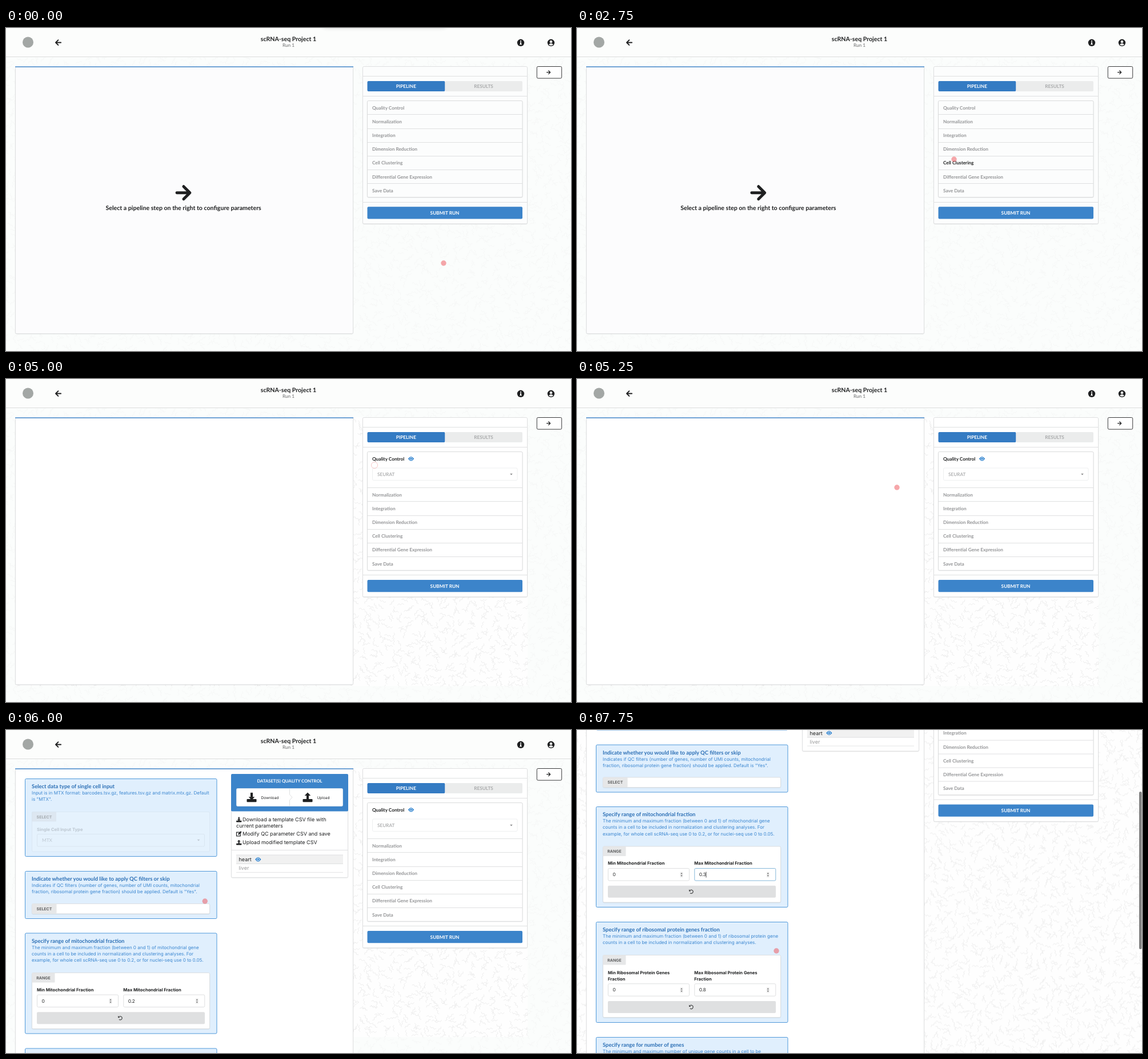
Write an HTML page with a canvas that moves like this. It is 989 px wide and 566 px high and loops after 8 s.

```html
<!DOCTYPE html>
<html lang="en">
<head>
<meta charset="utf-8">
<title>Pipeline setup</title>
<style>
html, body { margin: 0; width: 989px; height: 566px; overflow: hidden; background: #fff; }
canvas { display: block; }
</style>
</head>
<body>
<canvas id="stage" width="989" height="566"></canvas>
<script>
const W = 989, H = 566, LOOP = 8000, STEP = 250;
const ctx = document.getElementById('stage').getContext('2d');
ctx.textRendering = 'geometricPrecision';
const BLUE = '#3c84ca', INK = '#1f2021', DIM = '#949597', LINE = '#dfe0e1';
const LATO = 'Lato, sans-serif', INTER = 'Inter, sans-serif';
const STEPS = ['Quality Control', 'Normalization', 'Integration', 'Dimension Reduction',
  'Cell Clustering', 'Differential Gene Expression', 'Save Data'];
const ROW = 24.15, BODY = 8.26;

const POINTER = [[0, 766, 412], [250, 770, 411], [750, 790, 408], [1250, 804, 411], [1750, 803, 421],
  [2250, 745, 375], [2500, 690, 302], [2750, 660, 230], [3000, 647, 142], [3500, 645, 237], [3750, 645, 261],
  [4000, 645, 283], [4500, 645, 142], [5000, 645, 151], [5250, 560, 190], [5750, 349.5, 280],
  [6250, 347, 320], [6750, 335, 362], [7000, 335, 364], [7250, 342, 392], [7750, 349, 387]];
const SCROLL = [[6250, 0], [6750, 108.5], [7250, 108.5], [7750, 221.5]];
const RING_TIMES = [1750, 5000, 7250];

function track(keys, t) {
  if (t <= keys[0][0]) return keys[0].slice(1);
  for (let i = 1; i < keys.length; i++) {
    const a = keys[i - 1], b = keys[i];
    if (t <= b[0]) {
      const k = (t - a[0]) / (b[0] - a[0]);
      return a.slice(1).map((v, j) => v + (b[j + 1] - v) * k);
    }
  }
  return keys[keys.length - 1].slice(1);
}

function text(str, x, y, size, color = INK, { bold = false, face = LATO, align = 'left' } = {}) {
  ctx.font = `${bold ? 'bold ' : ''}${size}px ${face}`;
  ctx.fillStyle = color;
  ctx.textAlign = align;
  ctx.fillText(str, x, y + size * 0.35);
}

function box(x, y, w, h, fill, stroke, r = 2) {
  ctx.beginPath();
  ctx.roundRect(x, y, w, h, r);
  if (fill) { ctx.fillStyle = fill; ctx.fill(); }
  if (stroke) { ctx.strokeStyle = stroke; ctx.lineWidth = 1; ctx.stroke(); }
}

// A bordered box whose fill alone casts a soft shadow.
function card(x, y, w, h, fill, stroke, blur = 1.5) {
  ctx.save();
  ctx.shadowColor = 'rgba(34,36,38,.16)';
  ctx.shadowBlur = blur;
  ctx.shadowOffsetY = 0.8;
  box(x, y, w, h, fill);
  ctx.restore();
  if (stroke) box(x, y, w, h, null, stroke);
}

function rule(x1, x2, y, color = LINE) {
  ctx.fillStyle = color;
  ctx.fillRect(x1, y, x2 - x1, 1);
}

function disc(x, y, r, color) {
  ctx.beginPath();
  ctx.arc(x, y, r, 0, 7);
  ctx.fillStyle = color;
  ctx.fill();
}

function poly(points, color) {
  ctx.beginPath();
  points.forEach(([x, y]) => ctx.lineTo(x, y));
  ctx.fillStyle = color;
  ctx.fill();
}

// Runs a drawing in unit coordinates around (x, y).
function at(x, y, size, draw, flip = 1) {
  ctx.save();
  ctx.translate(x, y);
  ctx.scale(size * flip, size);
  draw();
  ctx.restore();
}

function arrow(x, y, size, dir = 1) {
  at(x, y, size, () => {
    ctx.strokeStyle = INK;
    ctx.lineWidth = 0.17;
    ctx.lineCap = ctx.lineJoin = 'round';
    ctx.beginPath();
    ctx.moveTo(-0.4, 0); ctx.lineTo(0.36, 0);
    ctx.moveTo(0.01, -0.38); ctx.lineTo(0.39, 0); ctx.lineTo(0.01, 0.38);
    ctx.stroke();
  }, dir);
}

function eye(x, y) {
  ctx.beginPath();
  ctx.moveTo(x - 5.2, y);
  ctx.quadraticCurveTo(x, y - 7.4, x + 5.2, y);
  ctx.quadraticCurveTo(x, y + 7.4, x - 5.2, y);
  ctx.fillStyle = '#2f83cf';
  ctx.fill();
  disc(x, y, 2.5, '#fff');
  disc(x, y, 1.7, '#2f83cf');
}

function transfer(x, y, size, up) {
  at(x, y, size, () => {
    ctx.fillStyle = INK;
    ctx.beginPath();
    ctx.roundRect(-0.5, 0.18, 1, 0.3, 0.06);
    ctx.fill();
    const tip = up ? -0.5 : 0.3, base = up ? -0.17 : -0.05;
    ctx.fillRect(-0.12, up ? -0.2 : -0.48, 0.24, 0.46);
    poly([[-0.31, base], [0.31, base], [0, tip]], INK);
  });
}

function pencil(x, y) {
  ctx.strokeStyle = INK;
  ctx.lineWidth = 1.2;
  ctx.strokeRect(x - 4.2, y - 2.8, 6.8, 6.6);
  ctx.lineWidth = 2.4;
  ctx.beginPath();
  ctx.moveTo(x - 1, y + 1); ctx.lineTo(x + 4, y - 4);
  ctx.stroke();
}

function undo(x, y) {
  ctx.strokeStyle = '#4a4b4c';
  ctx.lineWidth = 1.2;
  ctx.beginPath();
  ctx.arc(x, y, 3.1, -2.6, 2.3);
  ctx.stroke();
  poly([[x - 4, y - 4], [x - 4, y - 0.5], [x - 0.6, y - 0.5]], '#4a4b4c');
}

function caret(x, y, color) {
  poly([[x - 2.3, y - 1.2], [x + 2.3, y - 1.2], [x, y + 1.4]], color);
}

const pattern = (() => {
  const c = document.createElement('canvas');
  c.width = W; c.height = 820;
  const g = c.getContext('2d');
  let seed = 7;
  const rnd = () => (seed = seed * 16807 % 2147483647) / 2147483647;
  g.strokeStyle = '#ebebeb';
  g.lineWidth = 0.9;
  for (let y = 0; y < 830; y += 11) for (let x = 0; x < W; x += 12) {
    const a = rnd() * Math.PI * 2;
    let px = x + rnd() * 9, py = y + rnd() * 9;
    g.beginPath();
    g.moveTo(px, py);
    for (let i = 0; i < 4; i++) {
      const b = a + (i % 2 ? 0.65 : -0.65);
      g.lineTo(px += Math.cos(b) * 3.6, py += Math.sin(b) * 3.6);
    }
    g.stroke();
  }
  return c;
})();

function background(t, scroll) {
  const crisp = t >= 6250;
  ctx.fillStyle = crisp ? '#fefefe' : '#fbfdfc';
  ctx.fillRect(0, 0, W, H);
  ctx.globalAlpha = crisp ? 1 : 0.35;
  ctx.drawImage(pattern, 0, -scroll);
  ctx.globalAlpha = 1;
  if (t >= 4750 && !crisp) {
    ctx.fillStyle = '#fefefe';
    ctx.fillRect(17, 67, 896, 471);
    ctx.drawImage(pattern, 17, 67, 896, 471, 17, 67, 896, 471);
  }
}

function header(t) {
  ctx.fillStyle = '#fcfdfc';
  ctx.fillRect(0, 0, W, 50);
  rule(0, W, 50, '#dcdddd');
  if (t < 250) card(556, -12, 213, 11, '#ddd', null, 7);
  disc(38.5, 25, 9.5, '#a3a7a5');
  arrow(91.5, 25.5, 11.5, -1);
  text('scRNA-seq Project 1', 494.5, 19, 10.6, INK, { bold: true, align: 'center' });
  text('Run 1', 494.5, 30.5, BODY, '#6a6b6c', { align: 'center' });
  disc(901, 25.8, 6.2, INK);
  ctx.fillStyle = '#fff';
  ctx.fillRect(900, 22, 2, 1.8);
  ctx.fillRect(900, 24.8, 2, 4);
  ctx.fillRect(899.3, 28, 3.4, 1.2);
  disc(954, 25.8, 6.2, INK);
  ctx.save();
  ctx.beginPath();
  ctx.arc(954, 25.8, 5, 0, 7);
  ctx.clip();
  disc(954, 24, 2.3, '#fff');
  disc(954, 31.2, 4.2, '#fff');
  ctx.restore();
}

function leftPanel(t) {
  const bottom = t >= 5500 ? 1060 : 535.5;
  card(16.5, 68.5, 591, bottom - 68.5, t >= 4750 ? '#fff' : '#fcfcfd', LINE);
  ctx.fillStyle = BLUE;
  ctx.fillRect(16, 67.3, 592, 1.4);
  if (t < 4750) {
    const sway = -7 * Math.cos(Math.PI * (t / 1000 - 1.55));
    arrow(311.7 + sway, 288.7, 29);
    text('Select a pipeline step on the right to configure parameters', 311.7 + sway, 315.5, 10.6, INK,
      { bold: true, align: 'center' });
  } else if (t >= 5500) {
    forms(t);
    dataset();
  }
}

function message(y, h, title, lines) {
  box(33.5, y + 0.5, 335.5, h, '#e0effd', '#4f98da');
  text(title, 45, y + 14, 9.42, '#2b6fb5', { bold: true });
  lines.forEach((line, i) => text(line, 45, y + 25.4 + i * 11.2, 8, '#3a86d0', { face: INTER }));
}

function segment(y, h, label) {
  const w = label === 'RANGE' ? 40 : 43;
  card(45.5, y, 311, h, '#fff', '#dcdfe2');
  box(45.5, y, w, 17, '#e6e7e8', null, 1);
  text(label, 45.5 + w / 2, y + 9, 7, '#606162', { bold: true, face: INTER, align: 'center' });
}

function field(x, y, labels, value, focused) {
  labels.forEach((label, i) => text(label, x, y - 19.2 + (i - labels.length + 2) * 11, 7.6, INK, { bold: true, face: INTER }));
  box(x + 0.5, y + 0.5, 142, 21.5, '#fff', focused ? '#85b7d9' : '#dedfe0');
  text(value, x + 8.7, y + 11.3, BODY);
  if (focused) {
    ctx.fillStyle = INK;
    ctx.fillRect(x + 20.3, y + 6.5, 0.8, 10);
  }
  const sx = x + 129;
  box(sx - 2.5, y + 6.5, 5, 10, '#efefef', null, 1);
  poly([[sx - 1.6, y + 10.2], [sx + 1.6, y + 10.2], [sx, y + 8]], '#666');
  poly([[sx - 1.6, y + 12.6], [sx + 1.6, y + 12.6], [sx, y + 14.8]], '#666');
}

function resetButton(y) {
  box(54, y, 294, 21, '#dfe0e1');
  undo(200, y + 10.5);
}

function forms(t) {
  message(85, 136, 'Select data type of single cell input',
    ['Input is in MTX format: barcodes.tsv.gz, features.tsv.gz and matrix.mtx.gz. Default', 'is "MTX".']);
  ctx.globalAlpha = 0.45;
  box(45.5, 143.5, 311, 69.5, '#eaf3fc', '#cfdbe6');
  box(45.5, 143.5, 42.5, 17, '#d2dae2', null, 1);
  text('SELECT', 67, 152.5, 7, '#606162', { bold: true, face: INTER, align: 'center' });
  ctx.globalAlpha = 0.2;
  text('Single Cell Input Type', 54, 174, 7.6, INK, { bold: true, face: INTER });
  box(54.5, 182.5, 293, 21.5, null, '#aab4bd');
  text('MTX', 63, 193, BODY);
  caret(337, 193, INK);
  ctx.globalAlpha = 1;

  message(247, 83, 'Indicate whether you would like to apply QC filters or skip',
    ['Indicates if QC filters (number of genes, number of UMI counts, mitochondrial',
      'fraction, ribosomal protein gene fraction) should be applied. Default is "Yes".']);
  segment(304.5, 17.5, 'SELECT');

  message(355.5, 176, 'Specify range of mitochondrial fraction',
    ['The minimum and maximum fraction (between 0 and 1) of mitochondrial gene',
      'counts in a cell to be included in normalization and clustering analyses. For',
      'example, for whole cell scRNA-seq use 0 to 0.2, or for nuclei-seq use 0 to 0.05.']);
  segment(425.5, 98, 'RANGE');
  const edited = t >= 7000;
  field(54, 463.5, ['Min Mitochondrial Fraction'], '0');
  field(205.3, 463.5, ['Max Mitochondrial Fraction'], edited ? '0.3' : '0.2', edited);
  resetButton(494.3);

  message(557.5, 176, 'Specify range of ribosomal protein genes fraction',
    ['The minimum and maximum fraction (between 0 and 1) of ribosomal protein gene',
      'counts in a cell to be included in normalization and clustering analyses.']);
  segment(616, 109, 'RANGE');
  field(54, 665.7, ['Min Ribosomal Protein Genes', 'Fraction'], '0');
  field(205.3, 665.7, ['Max Ribosomal Protein Genes', 'Fraction'], '0.8');
  resetButton(696.5);

  message(759.5, 176, 'Specify range for number of genes',
    ['The minimum and maximum number of unique gene counts in a cell to be']);
}

function dataset() {
  card(394.5, 77.5, 204, 181, '#fff', LINE);
  box(394, 77, 205, 65.5, BLUE);
  text('DATASET(S) QUALITY CONTROL', 496.5, 89.3, 7.65, '#fff', { bold: true, align: 'center' });
  box(403.5, 102.5, 186, 31, '#fff', '#d8e3ee');
  ctx.strokeStyle = LINE;
  ctx.lineWidth = 1;
  ctx.beginPath();
  ctx.moveTo(496.5, 103); ctx.lineTo(496.5, 113); ctx.lineTo(501, 118); ctx.lineTo(496.5, 123); ctx.lineTo(496.5, 133);
  ctx.stroke();
  transfer(430, 118, 17, false);
  transfer(528, 118, 17, true);
  text('Download', 446.5, 118.3, 6.5, INK, { face: INTER });
  text('Upload', 544.5, 118.3, 6.5, INK, { face: INTER });

  const note = (str, x, y, color) => text(str, x, y, 9, color, { face: INTER });
  transfer(407.7, 157, 9.2, false);
  note('Download a template CSV file with', 414, 157);
  note('current parameters', 403, 167.7);
  pencil(407.7, 182);
  note('Modify QC parameter CSV and save', 414, 182);
  transfer(407.7, 197, 9.2, true);
  note('Upload modified template CSV', 414, 197);
  rule(395, 599, 210);
  ctx.fillStyle = '#f1f1f1';
  ctx.fillRect(403, 219, 187, 15.5);
  rule(403, 590, 218.5);
  rule(403, 590, 234);
  note('heart', 407.5, 227);
  eye(441.3, 226.8);
  note('liver', 407.5, 242, '#9a9b9c');
  rule(403, 590, 249, '#e4e5e6');
}

const rowAt = (t) => {
  const [x, y] = track(POINTER, t);
  return x > 632 && x < 904 && y > 127 && y < 297 ? Math.floor((y - 127.5) / ROW) : -1;
};

function rightPanel(t) {
  const open = t >= 4750, shift = open ? 38.8 : 0, fill = open ? '#fff' : '#fcfdfd';
  card(624.5, 67.5, 288, 275.5 + shift, fill, LINE);
  rule(624, 912, 84);
  rule(624, 912, 119);
  box(632.5, 93, 136, 18, '#347bc3');
  box(768.5, 93, 135.5, 18, '#ebecec');
  text('PIPELINE', 700.3, 102, BODY, '#fff', { bold: true, align: 'center' });
  text('RESULTS', 836, 102, BODY, '#a9aaab', { bold: true, align: 'center' });

  card(632.5, 127.5, 271.5, 169 + shift, fill, '#dadbdc');
  const hovered = open ? -1 : rowAt(t), fading = open ? -1 : rowAt(t - STEP);
  STEPS.forEach((name, i) => {
    const y = 140 + i * ROW + (i ? shift : 0);
    const active = open ? i === 0 : i === hovered;
    text(name, 641, y, BODY, active ? INK : i === fading ? '#707173' : DIM, { bold: true });
    if (i) rule(633, 904, Math.round(y - 12.7));
  });
  if (open) {
    eye(709, 139.8);
    box(641.5, 156, 253.5, 21.5, '#fff', '#eeeff0');
    text('SEURAT', 650, 167, BODY, '#98999a');
    caret(884.5, 167, '#8a8b8c');
  }
  rule(624, 912, Math.round(304.5 + shift));
  box(632.5, 313.3 + shift, 271.5, 21.2, BLUE);
  text('SUBMIT RUN', 768, 324 + shift, BODY, '#fff', { bold: true, align: 'center' });

  box(929.3, 67.5, 43.4, 20.6, '#fff', '#3a3b3c');
  arrow(949.7, 77.7, 7.6);
}

function pointer(t) {
  const [x, y] = track(POINTER, t);
  if (RING_TIMES.includes(t)) {
    ctx.beginPath();
    ctx.arc(x, y, 5.6, 0, 7);
    ctx.strokeStyle = 'rgba(238,125,125,.45)';
    ctx.lineWidth = 0.9;
    ctx.stroke();
  } else {
    disc(x, y, 4.7, 'rgba(238,80,85,.5)');
  }
}

function render(t) {
  const [scroll] = track(SCROLL, t);
  background(t, scroll);
  ctx.save();
  ctx.translate(0, -scroll);
  header(t);
  leftPanel(t);
  rightPanel(t);
  ctx.restore();
  if (scroll > 0) box(984, scroll * 0.488, 4.5, 276, '#7f7f7f', null, 2.2);
  pointer(t);
}

function tick() {
  render(Math.floor((performance.now() % LOOP) / STEP) * STEP);
  requestAnimationFrame(tick);
}
tick();
</script>
</body>
</html>
```
